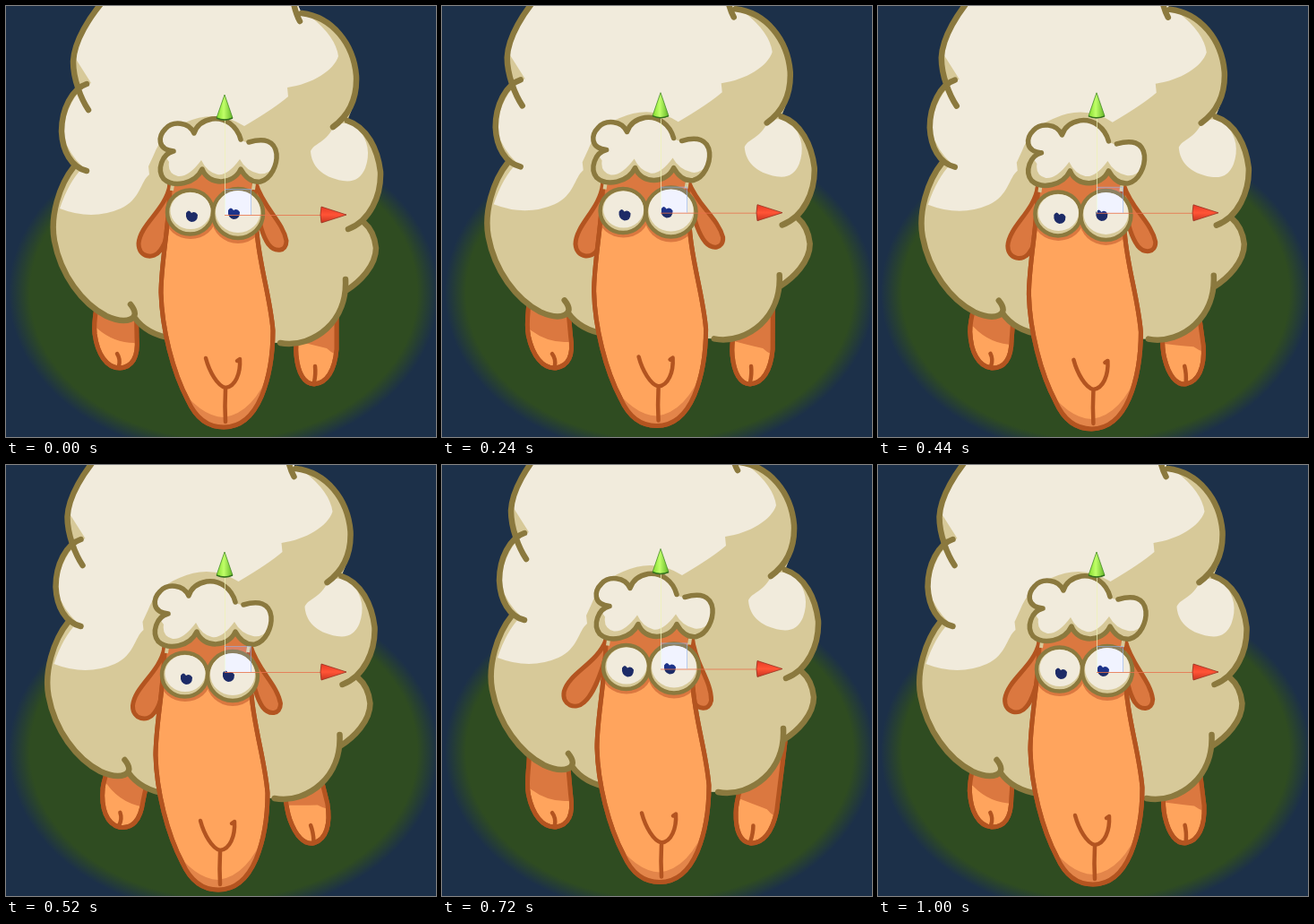
An HTML page that plays this animation: 480 by 481 pixels, repeating every 1.04 s.

```html
<!DOCTYPE html>
<html>
<head>
<meta charset="utf-8">
<style>
html, body { margin: 0; width: 100%; height: 100%; overflow: hidden; background: #1c3049; }
svg { display: block; width: 100vw; height: 100vh; }
.wool { fill: none; stroke: #8b793e; stroke-width: 6.5; stroke-linecap: round; stroke-linejoin: round; }
.skin { fill: #ffa45d; stroke: #b35420; stroke-width: 5; stroke-linecap: round; stroke-linejoin: round; }
.line { fill: none; stroke-width: 4.5; }
.edge { fill: none; }
.shade { fill: #db7840; }
.cream { fill: #f1ebdc; }
.tan { fill: #d7c999; }
</style>
</head>
<body>
<svg viewBox="0 0 480 481" preserveAspectRatio="none">
  <defs>
    <radialGradient id="grass">
      <stop offset=".9" stop-color="#2f4c21"/>
      <stop offset="1" stop-color="#2f4c21" stop-opacity="0"/>
    </radialGradient>
    <linearGradient id="green">
      <stop offset="0" stop-color="#83dc2c"/>
      <stop offset=".45" stop-color="#c0ff68"/>
      <stop offset="1" stop-color="#62b526"/>
    </linearGradient>
    <linearGradient id="red" x2="0" y2="1">
      <stop offset="0" stop-color="#e63b25"/>
      <stop offset=".5" stop-color="#ff5436"/>
      <stop offset="1" stop-color="#c93520"/>
    </linearGradient>
    <path id="fleece" d="M116-14C92 12 76 40 75 62Q75 78 80 91C68 100 62 120 62 140Q64 164 76 179C59 200 49 235 54 262C61 300 85 332 112 346Q130 354 143 346C152 360 165 370 182 372L305 376C325 380 345 372 358 360Q374 345 379 318C395 308 413 290 413 270Q412 251 399 241C413 230 419 210 418 185C415 160 403 135 381 128Q392 105 391 78C388 42 364 12 330 8L320-14Z"/>
    <clipPath id="inFleece"><use href="#fleece"/></clipPath>
    <path id="face" d="M186 178L183 200C183 240 173 285 173 320C174 360 186 408 203 440C212 460 226 470 243 470C262 470 276 457 285 436C295 412 298 385 298 362C295 325 283 290 280 252L276 178Z"/>
    <clipPath id="inFace"><use href="#face"/></clipPath>
    <path id="curl" d="M187 162C174 165 168 183 176 193C187 203 211 199 219 182C226 201 254 200 262 182C268 193 276 197 284 196C296 193 303 177 302 165C300 150 288 147 268 152L262 150C258 134 245 124 230 126Q214 129 210 141C204 129 186 128 178 137C170 145 168 160 187 162Z"/>
    <clipPath id="inCurl"><use href="#curl"/></clipPath>
    <path id="leftLeg" d="M103 318C103 335 97 347 99 366C102 388 112 404 127 404C141 403 148 392 146 370L145 318Z"/>
    <clipPath id="inLeft"><use href="#leftLeg"/></clipPath>
    <path id="rightLeg" d="M328 305V340C328 358 322 372 324 390C326 410 333 422 344 422C358 421 367 407 369 383V305Z"/>
    <clipPath id="inRight"><use href="#rightLeg"/></clipPath>
  </defs>

  <rect width="480" height="481" fill="#1c3049"/>
  <ellipse cx="243" cy="320" rx="240" ry="182" fill="url(#grass)"/>

  <g id="legL">
    <use href="#leftLeg" class="skin"/>
    <path class="shade" clip-path="url(#inLeft)" d="M90 310H155V375Q125 380 102 360L90 352Z"/>
    <use href="#leftLeg" class="skin edge"/>
    <path class="skin line" d="M124 388Q128 394 126 402"/>
  </g>
  <g id="legR">
    <use href="#rightLeg" class="skin"/>
    <path class="shade" clip-path="url(#inRight)" d="M315 300H380V393Q366 390 358 382Q340 378 318 372Z"/>
    <use href="#rightLeg" class="skin edge"/>
    <path class="skin line" d="M345 402Q346 410 344 420"/>
  </g>

  <g id="body">
    <use href="#fleece" class="tan"/>
    <g clip-path="url(#inFleece)" class="cream">
      <path d="M100-20L76 56L95 86C80 92 64 116 64 145Q70 165 86 180Q70 196 60 226Q96 240 128 226C150 216 150 196 160 188L159 179L165 166Q175 140 200 130Q235 114 266 134Q300 114 315 101L314 91C342 87 366 72 371 56Q368 34 340 12L322-20Z"/>
      <path d="M340 162C344 153 358 152 366 134Q380 126 394 138C404 150 407 165 401 181Q394 198 376 195C352 191 341 178 340 162Z"/>
    </g>
    <path class="wool" d="M116-14C92 12 76 40 75 62C75 82 84 104 92 116M90 87C74 92 62 115 62 140C63 162 73 180 90 184M76 179C59 200 49 235 54 262C61 300 85 332 112 346C134 356 153 350 139 333M143 347C152 360 165 368 186 371M306 376C325 380 345 372 358 360C373 346 380 326 379 305M379 318C395 308 413 290 413 270Q411 251 399 241M382 249C406 240 419 212 418 185C415 160 403 135 381 128M365 135C383 122 392 102 391 78C388 42 364 12 330 8M320-8Q323 8 328 17"/>
  </g>

  <g id="head">
    <path id="earL" class="skin shade" d="M183 200C178 228 150 243 148 265C148 281 165 283 172 273C181 262 184 240 186 222"/>
    <path id="earR" class="skin shade" d="M279 198C287 225 309 240 313 262C313 275 300 275 293 266C286 256 283 242 280 226"/>
    <use href="#face" class="skin"/>
    <g clip-path="url(#inFace)" class="shade">
      <path d="M170 170H290V240H170Z"/>
      <ellipse cx="206" cy="236" rx="28" ry="24"/>
      <ellipse cx="259" cy="238" rx="29" ry="27"/>
      <path d="M190 420Q216 458 243 459Q276 455 296 404L300 480H190Z" fill="#e3854a"/>
    </g>
    <use href="#face" class="skin edge" stroke-width="5.5"/>
    <path d="M186 199L185 206M277 198L276 205" stroke="#d7c999" stroke-width="4"/>
    <path class="skin line" d="M223 393C227 408 236 424 245 426C256 425 262 410 261 394L258 396M245 428Q244 447 245 464"/>
    <g stroke="#8b793e" stroke-width="4.5" class="tan">
      <ellipse cx="205.500" cy="230" rx="25.500" ry="24.500"/>
      <ellipse class="cream" stroke="none" cx="206" cy="228.500" rx="22.500" ry="20.500"/>
      <ellipse cx="259" cy="231.500" rx="28" ry="27.500"/>
      <ellipse class="cream" stroke="none" cx="259" cy="229.500" rx="25" ry="23.500"/>
    </g>
    <g fill="#1d2b67">
      <path id="pupil" d="M201 231Q204 226 207 231Q211 228 214 233Q214 241 207 241Q200 239 201 231Z"/>
      <use href="#pupil" x="47" y="-3"/>
    </g>
    <use href="#curl" class="tan"/>
    <path clip-path="url(#inCurl)" class="cream" d="M160 110H310V168Q294 190 282 187Q268 184 261 171Q247 190 236 188Q224 185 218 172Q204 191 192 190Q180 187 182 174L172 160Z"/>
    <path class="wool" style="stroke-width:5.500" d="M187 162C174 165 168 183 176 193C187 203 211 199 219 182C226 201 254 200 262 182C268 193 276 197 284 196C296 193 303 177 302 165C300 150 288 147 271 152M262 149C258 134 245 124 230 126Q214 129 210 142C204 129 186 128 178 137C170 145 168 160 187 162"/>
  </g>

  <g id="gizmo">
    <path d="M244.500 126V233" stroke="#eef2b8" stroke-opacity=".75"/>
    <path d="M244 233.500H352" stroke="#e8714c" stroke-opacity=".8"/>
    <rect x="244" y="204" width="30" height="29" fill="#000823" style="mix-blend-mode:plus-lighter"/>
    <path d="M244 204.500H273.500V233" fill="none" stroke="#92b0e0" stroke-opacity=".6"/>
    <path d="M244 99L235 125Q244 129 253 125Z" fill="url(#green)" stroke="#478b28" stroke-width=".8"/>
    <path d="M235 125Q244 129 253 125" fill="none" stroke="#35701f" stroke-width="1.500"/>
    <path d="M380 233L352 224Q350 233 352 242Z" fill="url(#red)" stroke="#963322" stroke-width=".8"/>
  </g>
</svg>
<script>
const LOOP = 1040, STEP = 40, HOLD = 120;
const times = [0, 120, 320, 520, 720, 840, 1000, LOOP];
const poses = {
  bodyX: [0, -6.5, 0, -6.5, 2, 0, -6.5],
  bodyY: [0, -4, -5, -4, -11, 0, -4],
  headX: [0, -6, -2, -6, 0, 0, -3],
  headY: [0, -0.5, -2, 4, -4.5, 0.3, -2],
  ear: [0, 2.5, 4.5, -0.5, -11, -2, -3],
  legL: [0, 3, -8, 13, -4, 5, 5],
  legR: [0, -5, 3, -14, 7, -7, -7]
};

const $ = id => document.getElementById(id);
const move = (id, transform) => $(id).setAttribute('transform', transform);

function poseAt(t) {
  const i = times.findLastIndex(k => k <= t);
  const u = (t - times[i]) / (times[i + 1] - times[i]);
  const ease = u * u * (3 - 2 * u);
  const pose = {};
  for (const key in poses) {
    const v = poses[key];
    pose[key] = v[i] + (v[(i + 1) % v.length] - v[i]) * ease;
  }
  return pose;
}

function draw(now) {
  const t = now % LOOP;
  const p = poseAt(t < HOLD ? 0 : Math.floor(t / STEP) * STEP);
  move('body', `translate(${p.bodyX} ${p.bodyY})`);
  move('gizmo', `translate(0 ${p.bodyY / 2})`);
  move('head', `translate(${p.headX} ${p.headY})`);
  move('earL', `rotate(${-p.ear} 183 200)`);
  move('earR', `rotate(${-p.ear} 280 200)`);
  move('legL', `rotate(${p.legL} 126 403)`);
  move('legR', `rotate(${p.legR} 343 422)`);
}

const start = performance.now();
function tick() {
  draw(performance.now() - start);
  requestAnimationFrame(tick);
}
tick();
</script>
</body>
</html>
```
